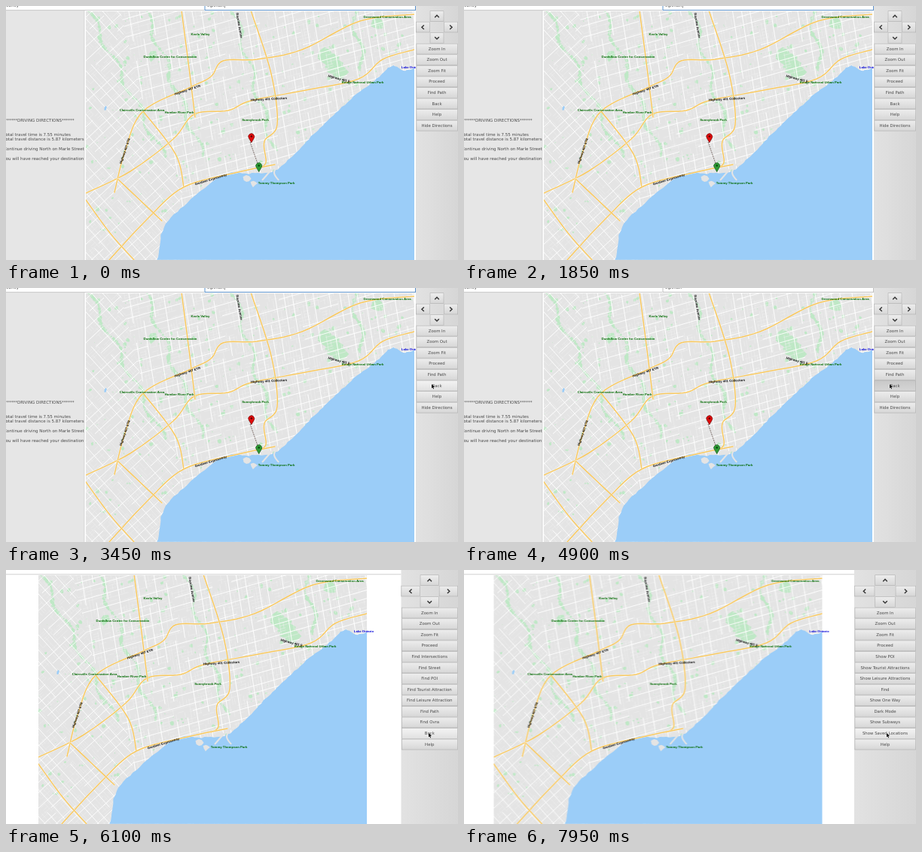
An HTML page with a canvas for the animation above (8 s loop, 600 px wide and 338 px high).

```html
<!DOCTYPE html>
<html lang="en">
<head>
<meta charset="utf-8">
<title>City map browser</title>
<style>
html, body { margin: 0; width: 100%; height: 100%; overflow: hidden; background: #fff; }
canvas { display: block; width: 600px; height: 338px; }
</style>
</head>
<body>
<canvas id="stage"></canvas>
<script>
const W = 600, H = 338, LOOP = 8000, RAD = Math.PI / 180;
const LAND = '#e4e4e4', WATER = '#9bcdf8', PARK = '#bfe8c6';
const scale = Math.max(1, window.devicePixelRatio || 1);

function sized(canvas) {
  canvas.width = W * scale;
  canvas.height = H * scale;
  const c = canvas.getContext('2d');
  c.scale(scale, scale);
  return c;
}
const ctx = sized(document.getElementById('stage'));
const mapCanvas = document.createElement('canvas');

// Map extent on the first screen; the other screens only shift it.
const MAP = { x: 106, y: 7, w: 436, h: 331 };

function random(seed) {
  return () => {
    seed = (seed + 0x6D2B79F5) | 0;
    let t = Math.imul(seed ^ (seed >>> 15), 1 | seed);
    t = (t + Math.imul(t ^ (t >>> 7), 61 | t)) ^ t;
    return ((t ^ (t >>> 14)) >>> 0) / 4294967296;
  };
}

// "x,y x,y ..." to a list of points
const points = s => s.split(' ').map(p => p.split(',').map(Number));

function trace(c, pts, closed) {
  c.beginPath();
  pts.forEach(([x, y], i) => i ? c.lineTo(x, y) : c.moveTo(x, y));
  if (closed) c.closePath();
}

// Catmull-Rom curve through a few key points
function spline(keys, steps = 8) {
  const out = [keys[0]];
  for (let i = 1; i < keys.length; i++) {
    const a = keys[i - 2] || keys[i - 1], b = keys[i - 1], c = keys[i], d = keys[i + 1] || c;
    for (let s = 1; s <= steps; s++) {
      const t = s / steps;
      out.push([0, 1].map(k => b[k] + .5 * t * (c[k] - a[k] +
        t * (2 * a[k] - 5 * b[k] + 4 * c[k] - d[k] + t * (3 * (b[k] - c[k]) + d[k] - a[k])))));
    }
  }
  return out;
}

function roughen(pts, amount, seed) {
  const rnd = random(seed);
  return pts.map(p => p.map(v => v + (rnd() - .5) * amount));
}

// Two families of streets, broken into random pieces
function grid(c, a, b, step, keep, color, width, seed) {
  const rnd = random(seed), R = 420, piece = step * 2;
  c.strokeStyle = color;
  c.lineWidth = width;
  c.beginPath();
  for (const [along, across] of [[a, b], [b, a]]) {
    const dx = Math.cos(along), dy = Math.sin(along), ax = Math.cos(across), ay = Math.sin(across);
    for (let k = -R; k < R; k += step * (.7 + rnd() * .6)) {
      for (let s = -R; s < R; s += piece) {
        if (rnd() > keep) continue;
        const x = 234 + ax * k + dx * s, y = 6 + ay * k + dy * s;
        c.moveTo(x, y);
        c.lineTo(x + dx * piece, y + dy * piece);
      }
    }
  }
  c.stroke();
}

function blob(c, x, y, r, rnd) {
  trace(c, Array.from({ length: 7 }, (_, k) => {
    const t = k / 7 * 2 * Math.PI, d = r * (.6 + rnd() * .7);
    return [x + Math.cos(t) * d, y + Math.sin(t) * d];
  }), true);
  c.fill();
}

function parks(c) {
  const rnd = random(41);
  c.fillStyle = PARK;
  for (let i = 0; i < 420; i++) {
    blob(c, MAP.x + rnd() * MAP.w, MAP.y + rnd() * 300, .5 + 2.6 * rnd() ** 2, rnd);
  }
  // green valleys run from top to bottom
  for (const [from, to] of [[182, 262], [300, 356], [106, 210], [460, 474]]) {
    const bottom = 60 + rnd() * 20 + (from < 400 ? 130 : 20);
    for (let y = MAP.y; y < bottom; y += 2.5) {
      const x = from + (to - from) * y / bottom + 5 * Math.sin(y / 9 + from);
      blob(c, x, y, 1 + rnd() * 2, rnd);
    }
  }
  for (let i = 0; i < 5; i++) blob(c, 425 + i * 4.5, 64 + i * 6, 11, rnd);
  blob(c, 494, 22, 9, rnd);
  blob(c, 194, 66, 7, rnd);
}

const COAST = '542,83 528,86 512,80 492,97 462,120 430,150 405,174 380,200 357,219 322,223 288,225 241,262 210,294 201,338';

const HIGHWAYS = [
  '106,249 165,220 222,177 250,144 295,139 325,126 398,112 468,97 500,71 542,58',
  '144,248 158,193 182,140 245,108 272,94 288,73 333,71 393,58 470,20 542,11',
  '233,6 242,75 251,148',
  '325,6 352,90 360,158 343,180 345,208 335,216',
  '182,140 225,197 236,241',
  '357,211 304,222 236,241 189,282 137,338',
  '106,258 138,302 170,338',
  '148,230 207,286'
];

const LABELS = [
  ['Greenwood Conservation Area', 506, 15], ['Keele Valley', 258, 38],
  ['Dunfallow Centre for Conservation', 218, 68], ['Claireville Conservation Area', 180.5, 139],
  ['Humber River Park', 230, 142], ['Sunnybrook Park', 331, 151.5],
  ['Rouge National Urban Park', 473.5, 101.5], ['Tommy Thompson Park', 359, 235.5],
  ['Lake Ontario', 538, 82, 0, '#0000d8'],
  ['Highway 407 ETR', 241, 112, -18, '#111'], ['Highway 407 ETR', 158, 193, -71, '#111'],
  ['Highway 401 Collectors', 349, 124, -3, '#111'], ['Highway 401 E', 442, 97, 15, '#111'],
  ['Gardiner Expressway', 272, 231, -17, '#111'], ['Bayview Avenue', 309.5, 26, 80, '#111']
];

function paintMap(c) {
  c.save();
  c.beginPath();
  c.rect(MAP.x, MAP.y, MAP.w, MAP.h);
  c.clip();
  c.fillStyle = LAND;
  c.fillRect(MAP.x, MAP.y, MAP.w, MAP.h);
  parks(c);

  // the western suburbs are laid out diagonally
  const west = '100,0 150,0 183,135 236,241 210,338 100,338';
  const east = '150,0 560,0 560,338 210,338 236,241 183,135';
  for (const [area, a, b, seed] of [[west, -43, 48, 3], [east, -16, 81, 8]]) {
    c.save();
    trace(c, points(area), true);
    c.clip();
    grid(c, a * RAD, b * RAD, 4, .4, '#efefef', .5, seed);
    grid(c, a * RAD, b * RAD, 13, .8, '#fff', .9, seed + 1);
    c.restore();
  }

  c.fillStyle = WATER;
  trace(c, [...roughen(spline(points(COAST)), 1.8, 17), [542, 338]], true);
  c.fill();
  c.beginPath();
  c.ellipse(132, 136, 1.4, 3, .3, 0, 7);
  c.fill();

  // harbour islands and the spit
  c.fillStyle = c.strokeStyle = LAND;
  blob(c, 320, 230, 5, random(2));
  blob(c, 329, 236, 5, random(6));
  c.lineWidth = 2;
  trace(c, spline(points('365,206 356,221 362,232')));
  c.stroke();
  trace(c, points('353,217 340,232'));
  c.stroke();

  c.lineJoin = c.lineCap = 'round';
  for (const road of HIGHWAYS) {
    trace(c, spline(points(road)));
    for (const [color, width] of [['#fff', 2], ['#f6c75f', 1.5]]) {
      c.strokeStyle = color;
      c.lineWidth = width;
      c.stroke();
    }
  }
  c.restore();

  c.textAlign = 'center';
  c.textBaseline = 'middle';
  c.font = 'bold 4.3px "Liberation Sans", sans-serif';
  for (const [text, x, y, angle = 0, color = '#006a00'] of LABELS) {
    c.save();
    c.translate(x, y);
    c.rotate(angle * RAD);
    c.fillStyle = color;
    c.fillText(text, 0, 0);
    c.restore();
  }
}
paintMap(sized(mapCanvas));

const ZOOM = ['Zoom In', 'Zoom Out', 'Zoom Fit', 'Proceed'];
const SCREENS = [
  { from: 0, side: 544, left: 104, shift: 0, route: true,
    buttons: [...ZOOM, 'Find Path', 'Back', 'Help', 'Hide Directions'] },
  { from: 5000, side: 524.5, left: 0, shift: -63,
    buttons: [...ZOOM, 'Find Intersections', 'Find Street', 'Find POI', 'Find Tourist Attraction',
      'Find Leisure Attraction', 'Find Path', 'Find Ovra', 'Back', 'Help'] },
  { from: 7750, side: 518, left: 0, shift: -66.5,
    buttons: [...ZOOM, 'Show POI', 'Show Tourist Attractions', 'Show Leisure Attractions', 'Find',
      'Show One Way', 'Dark Mode', 'Show Subways', 'Show Saved Locations', 'Help'] }
];

function line(x1, y1, x2, y2, color, width) {
  ctx.strokeStyle = color;
  ctx.lineWidth = width;
  trace(ctx, [[x1, y1], [x2, y2]]);
  ctx.stroke();
}

function write(text, x, y, align = 'left', size = 5.5) {
  ctx.font = size + 'px "DejaVu Sans", sans-serif';
  ctx.textAlign = align;
  ctx.textBaseline = 'middle';
  ctx.fillStyle = '#4a4a4a';
  ctx.fillText(text, x, y);
}

const SHADES = {
  normal: ['#eeeeee', '#d6d6d6'],
  hover: ['#f4f4f4', '#e0e0e0'],
  pressed: ['#c8c8c8', '#d6d6d6']
};

function button(x, y, w, h, state) {
  const g = ctx.createLinearGradient(0, y, 0, y + h);
  SHADES[state].forEach((shade, i) => g.addColorStop(i, shade));
  ctx.fillStyle = g;
  ctx.fillRect(x, y, w, h);
  ctx.strokeStyle = '#b4b4b4';
  ctx.lineWidth = .7;
  ctx.strokeRect(x + .35, y + .35, w - .7, h - .7);
}

function chevron(x, y, angle) {
  ctx.save();
  ctx.translate(x, y);
  ctx.rotate(angle);
  ctx.strokeStyle = '#333';
  ctx.lineWidth = 1.4;
  trace(ctx, [[-2.8, 1.5], [0, -1.4], [2.8, 1.5]]);
  ctx.stroke();
  ctx.restore();
}

function sidebar(screen, mouse, pressed) {
  const x = screen.side, w = W - x, cell = w / 3, row = 14.58;
  const g = ctx.createLinearGradient(x, 0, W, 0);
  g.addColorStop(0, '#e2e2e2');
  g.addColorStop(1, '#d6d6d6');
  ctx.fillStyle = g;
  ctx.fillRect(x, 0, w, H);
  for (let turn = 0; turn < 4; turn++) {
    const angle = turn * Math.PI / 2;
    const bx = x + cell * (1 + Math.round(Math.sin(angle)));
    const by = 6.3 + 14.5 * (1 - Math.round(Math.cos(angle)));
    button(bx, by, cell, 14.5, 'normal');
    chevron(bx + cell / 2, by + 7.4, angle);
  }
  screen.buttons.forEach((label, i) => {
    const y = 49.8 + i * row;
    const over = mouse && mouse[0] > x && mouse[1] >= y && mouse[1] < y + row;
    button(x + .5, y, w - .5, row, over ? (pressed ? 'pressed' : 'hover') : 'normal');
    write(label, x + w / 2, y + 7.4, 'center', 5.4);
  });
}

function pin(x, y, color, dark) {
  ctx.fillStyle = color;
  ctx.strokeStyle = dark;
  ctx.lineWidth = .6;
  ctx.beginPath();
  ctx.moveTo(x, y + 8);
  ctx.arc(x, y, 4, 2.5, .64);
  ctx.closePath();
  ctx.fill();
  ctx.stroke();
  ctx.fillStyle = dark;
  ctx.beginPath();
  ctx.arc(x, y - .3, 1.3, 0, 7);
  ctx.fill();
}

function routeScreen(focused) {
  ctx.fillStyle = '#e6e6e6';
  ctx.fillRect(0, 6, 104, H);
  line(104, 6, 104, H, '#c8c8c8', .6);

  line(0, 5.6, 263, 5.6, '#b9b9b9', .8);
  ctx.strokeStyle = focused ? '#4a86c5' : '#b9b9b9';
  ctx.lineWidth = .9;
  ctx.strokeRect(264, -5, 279.5, 10.6);
  write('varley', 0, -.8);
  write('eglinton', 267, -.8);
  if (focused) line(290.3, 0, 290.3, 2.5, '#333', .6);

  write('*******DRIVING DIRECTIONS******', 90.5, 152.4, 'right');
  write('Total travel time is 7.55 minutes', -3, 171.2);
  write('Total travel distance is 5.87 kilometers', -3, 177.8);
  write('Continue driving North on Marle Street', -3, 190.7);
  write('You will have reached your destination', -3, 203.7);

  ctx.setLineDash([1.8, 1]);
  line(324, 181, 334.5, 211, '#6a5a55', .9);
  ctx.setLineDash([]);
  pin(325.8, 173.8, '#e00b0b', '#5c0000');
  pin(335.7, 212.7, '#2f9a35', '#0b4d10');
}

// Pointer stops: time, x, y
const STOPS = [[2250, 430, 0], [2550, 540, 111], [2900, 565, 128], [5250, 565, 128], [5950, 561, 217], [LOOP, 561, 217]];

function pointer(t) {
  if (t < STOPS[0][0]) return null;
  const i = STOPS.findIndex(s => s[0] > t);
  const [t0, x0, y0] = STOPS[i - 1], [t1, x1, y1] = STOPS[i];
  const u = (t - t0) / (t1 - t0), e = u * u * (3 - 2 * u);
  return [x0 + (x1 - x0) * e, y0 + (y1 - y0) * e];
}

function arrow(x, y) {
  ctx.save();
  ctx.translate(x, y);
  trace(ctx, points('0,0 0,5.4 1.3,4.3 2.3,6.5 3.2,6.1 2.2,4 4,3.8'), true);
  ctx.strokeStyle = '#fff';
  ctx.lineWidth = .8;
  ctx.stroke();
  ctx.fillStyle = '#000';
  ctx.fill();
  ctx.restore();
}

function draw(t) {
  const screen = SCREENS.filter(s => t >= s.from).pop();
  const mouse = pointer(t);
  const pressed = (t >= 4700 && t < 5000) || (t >= 6650 && t < 7750);
  ctx.fillStyle = '#fff';
  ctx.fillRect(0, 0, W, H);
  ctx.save();
  ctx.beginPath();
  ctx.rect(screen.left, 6, screen.side - screen.left, H);
  ctx.clip();
  ctx.drawImage(mapCanvas, screen.shift, 0, W, H);
  ctx.restore();
  if (screen.route) routeScreen(t < 4700);
  else line(0, 5.8, screen.side, 5.8, '#c4c4c4', .8);
  sidebar(screen, mouse, pressed);
  if (mouse) arrow(...mouse);
}

function tick() {
  draw(performance.now() % LOOP);
  requestAnimationFrame(tick);
}
tick();
</script>
</body>
</html>
```
